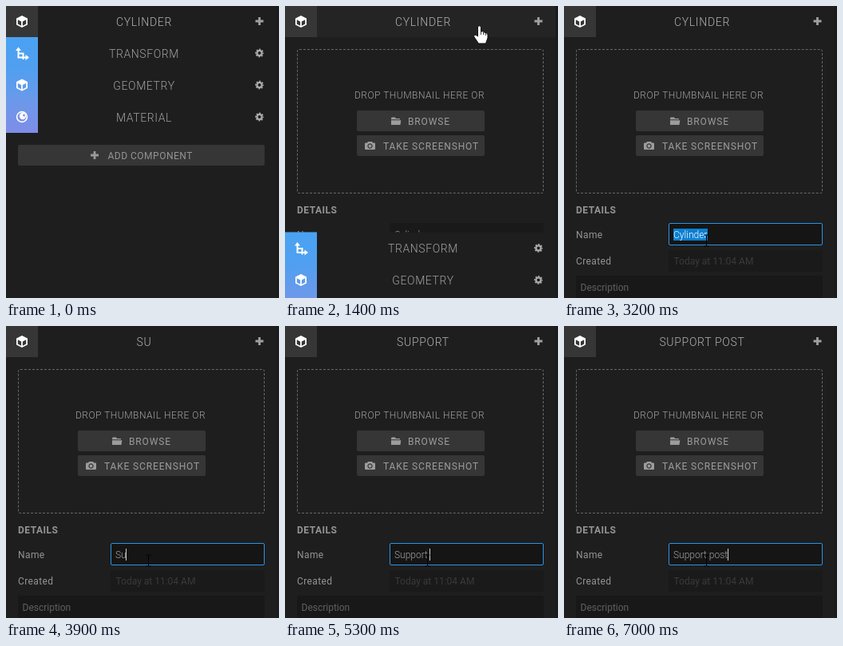
Animation of 342x366 px, one loop 7100 ms. Source, as an HTML page:

```html
<!DOCTYPE html>
<html lang="en">
<head>
<meta charset="utf-8">
<title>Component panel</title>
<style>
html, body { margin: 0; width: 100%; height: 100%; overflow: hidden; background: #1e1e1e; }
svg { display: block; width: 342px; height: 366px; cursor: default; }
text { font: 12px Roboto, sans-serif; fill: #949494; white-space: pre; }
.title, .row { font-size: 14px; font-weight: 300; text-anchor: middle; }
.title { letter-spacing: .7px; fill: #b2b2b2; }
.row { letter-spacing: .6px; fill: #a0a0a0; }
.caps { letter-spacing: .5px; }
.light { font-weight: 300; fill: #a4a4a4; }
.button { letter-spacing: .85px; fill: #9c9c9c; }
.label { letter-spacing: .4px; }
.bold { font-weight: 700; letter-spacing: .5px; }
.drop { box-sizing: border-box; height: 181px; border: 1px dashed #686868; border-radius: 3px; }
</style>
</head>
<body>
<svg viewBox="0 0 342 366">
  <defs>
    <path id="cube" fill="#fff" fill-rule="evenodd" d="M0-7.5L7-4V4L0 7.5L-7 4V-4ZM-5.2-2.2V3L-.9 5.2V0ZM5.2-2.2V3L.9 5.2V0Z"/>
    <path id="plus" d="M-5 0H5M0-5V5" stroke-width="2.8"/>
    <g id="gear" fill="none" stroke="#aaa">
      <circle r="3.1" stroke-width="2.4"/>
      <circle r="4.6" stroke-width="1.6" stroke-dasharray="1.9 1.713" stroke-dashoffset=".95"/>
    </g>
    <clipPath id="reveal"><rect id="revealBox" y="39" width="342" height="0"/></clipPath>
    <linearGradient id="blues" x2="0" y2="1">
      <stop stop-color="#4aa2f2"/><stop offset=".33" stop-color="#509ff0"/>
      <stop offset=".66" stop-color="#6b99ea"/><stop offset="1" stop-color="#7f8de8"/>
    </linearGradient>
  </defs>

  <rect width="342" height="366" fill="#1e1e1e"/>

  <g id="rows">
    <rect id="rowHover" x="40" width="299" height="40" fill="#242424"/>
    <rect y="39" width="40" height="120" fill="url(#blues)"/>
    <g fill="none" stroke="#fff" stroke-width="2">
      <path d="M15.5 54V64.5H26M15.5 59.5H21.5V67"/>
      <path d="M12 56L15.5 51.5L19 56ZM24.5 61L29 64.5L24.5 68Z" fill="#fff" stroke="none"/>
      <circle cx="20" cy="139" r="6.4" stroke-width="1.6"/>
      <circle cx="21" cy="138" r="4.2" fill="#fff" stroke="none"/>
      <circle cx="22.5" cy="137" r="1.4" fill="#7c92e8" stroke="none"/>
    </g>
    <use href="#cube" x="20" y="99"/>
    <text class="row" x="173" y="65">TRANSFORM</text>
    <text class="row" x="173" y="105">GEOMETRY</text>
    <text class="row" x="173" y="145">MATERIAL</text>
    <use href="#gear" x="317.5" y="59"/>
    <use href="#gear" x="317.5" y="99"/>
    <use href="#gear" x="317.5" y="139"/>
    <rect x="15" y="174" width="309" height="26" rx="2" fill="#363636"/>
    <use href="#plus" x="111" y="187" stroke="#999"/>
    <text class="caps" x="127.5" y="192">ADD COMPONENT</text>
  </g>

  <g id="details" clip-path="url(#reveal)">
    <foreignObject x="15" y="54" width="309" height="181"><div class="drop"></div></foreignObject>
    <text class="caps light" x="87" y="116">DROP THUMBNAIL HERE OR</text>
    <rect x="90" y="131" width="160" height="26" rx="2" fill="#363636"/>
    <rect x="90" y="162" width="160" height="26" rx="2" fill="#363636"/>
    <path fill="#9c9c9c" d="M133 141Q133 139.5 134 139.5H138L139 141H144V142.3H133ZM133 143.2H145.3L144.5 149H133Z"/>
    <path fill="#9c9c9c" fill-rule="evenodd" d="M101 171.5H103L104 170H109L110 171.5H112Q113 171.5 113 172.5V179Q113 180 112 180H101Q100 180 100 179V172.5Q100 171.5 101 171.5ZM106.5 172.3A3.2 3.2 0 1 0 106.51 172.3Z"/>
    <circle cx="106.5" cy="175.5" r="1.9" fill="#9c9c9c"/>
    <text class="button" x="154" y="149">BROWSE</text>
    <text class="button" x="123" y="180">TAKE SCREENSHOT</text>
    <text class="bold" x="15" y="260">DETAILS</text>
    <text class="label" x="15" y="291">Name</text>
    <text class="label" x="15" y="324">Created</text>
    <rect id="field" x="131.5" y="272.5" width="192" height="27" rx="1.5"/>
    <rect id="selection" x="137" y="279" width="43" height="15" fill="#0b7fd2"/>
    <text id="name" class="light" x="137" y="291"></text>
    <rect id="caret" y="279" width="1" height="15" fill="#ccc"/>
    <rect x="131" y="306" width="193" height="27" rx="2" fill="#1a1a1a"/>
    <text x="137.5" y="324" style="fill:#3a3a3a">Today at 11:04 AM</text>
    <rect x="15" y="338" width="309" height="30" rx="2" fill="#181818"/>
    <text x="20.5" y="357" style="fill:#606060">Description</text>
  </g>

  <rect id="headerHover" x="40" width="299" height="39" fill="#242424"/>
  <rect width="40" height="39" fill="#363636"/>
  <use href="#cube" x="20" y="19.5"/>
  <text id="title" class="title" x="173" y="25"></text>
  <use href="#plus" x="317.5" y="19" stroke="#a0a0a0"/>
  <rect x="339" width="3" height="366" fill="#1b1b1b"/>

  <g id="pointer">
    <g id="hand" fill="#fff" stroke="#111" stroke-linejoin="round">
      <path d="M-2 1Q0-1.5 2 1V7Q5 6 6 8Q10 8 10.5 11V15L8 22H-1L-7 13Q-6 9.5-2 13Z"/>
      <path d="M2 7V11M5 8V11M8 9V12" stroke-width=".8"/>
    </g>
    <path id="arrow" d="M0 0V16L3.8 12.6L6.6 19L9.3 17.8L6.5 11.5H11.5Z" fill="#fff" stroke="#111" stroke-width=".5"/>
    <path id="beam" d="M-3-6.5H-1L0-5.5L1-6.5H3M0-5.5V6.5M-3 7.5H-1L0 6.5L1 7.5H3" fill="none" stroke="#000"/>
  </g>
</svg>
<script>
const LOOP = 7100, STEP = 100;
const OPEN_START = 1200, OPEN_END = 1500, FOCUS = 2700, BLINK = 500;
const TYPED = "Support post";
const KEY_TIMES = [3400, 3600, 4300, 4500, 4700, 4800, 5000, 5200, 5400, 5600, 5800, 5900];
// Pointer stops: time, x, y
const STOPS = [[0, -20, 128], [800, 243.5, 25], [1600, 243.5, 25], [2000, 176, 300], [2200, 176, 300], [2500, 178.5, 293.5]];

const el = id => document.getElementById(id);
const show = (id, visible) => el(id).setAttribute("visibility", visible ? "visible" : "hidden");
const ease = k => k * k * (3 - 2 * k);
const progress = (t, from, to) => ease(Math.min(1, Math.max(0, (t - from) / (to - from))));

function pointerAt(t) {
  let [, x, y] = STOPS[0];
  for (let i = 1; i < STOPS.length; i++) {
    const k = progress(t, STOPS[i - 1][0], STOPS[i][0]);
    x += (STOPS[i][1] - STOPS[i - 1][1]) * k;
    y += (STOPS[i][2] - STOPS[i - 1][2]) * k;
  }
  return [x, y];
}

function drawPanel(t) {
  const shift = 330 * progress(t, OPEN_START, OPEN_END);
  el("rows").setAttribute("transform", `translate(0 ${shift})`);
  el("revealBox").setAttribute("height", shift);
}

function drawPointer(t) {
  const [x, y] = pointerAt(t);
  const closed = t < OPEN_START;
  const inHeader = y < 39;
  const inRows = closed && x > 0 && y >= 39 && y < 159;
  const overField = !closed && y > 272 && y < 300;
  const hand = inHeader || inRows;
  el("pointer").setAttribute("transform", `translate(${x} ${y})`);
  show("hand", hand);
  show("beam", !hand && overField);
  show("arrow", !hand && !overField);
  show("headerHover", inHeader);
  show("rowHover", inRows);
  el("rowHover").setAttribute("y", 39 + 40 * Math.floor((y - 39) / 40));
}

function drawName(t) {
  const count = KEY_TIMES.filter(time => time <= t).length;
  const value = count ? TYPED.slice(0, count) : "Cylinder";
  const focused = t >= FOCUS;
  const selected = focused && !count;
  const sinceKey = t - KEY_TIMES[count - 1];
  el("title").textContent = value.trim().toUpperCase();
  el("name").textContent = value;
  el("name").style.fill = selected ? "#fff" : "";
  el("field").setAttribute("fill", focused ? "#151515" : "#191919");
  el("field").setAttribute("stroke", focused ? "#2d93e4" : "#191919");
  show("selection", selected);
  show("caret", count && Math.floor(sinceKey / BLINK) % 2 === 0);
  el("caret").setAttribute("x", Math.floor(137 + el("name").getComputedTextLength()));
}

function frame(now) {
  const t = Math.floor((now % LOOP) / STEP) * STEP;
  drawPanel(t);
  drawPointer(t);
  drawName(t);
  requestAnimationFrame(frame);
}
frame(0);
</script>
</body>
</html>
```
